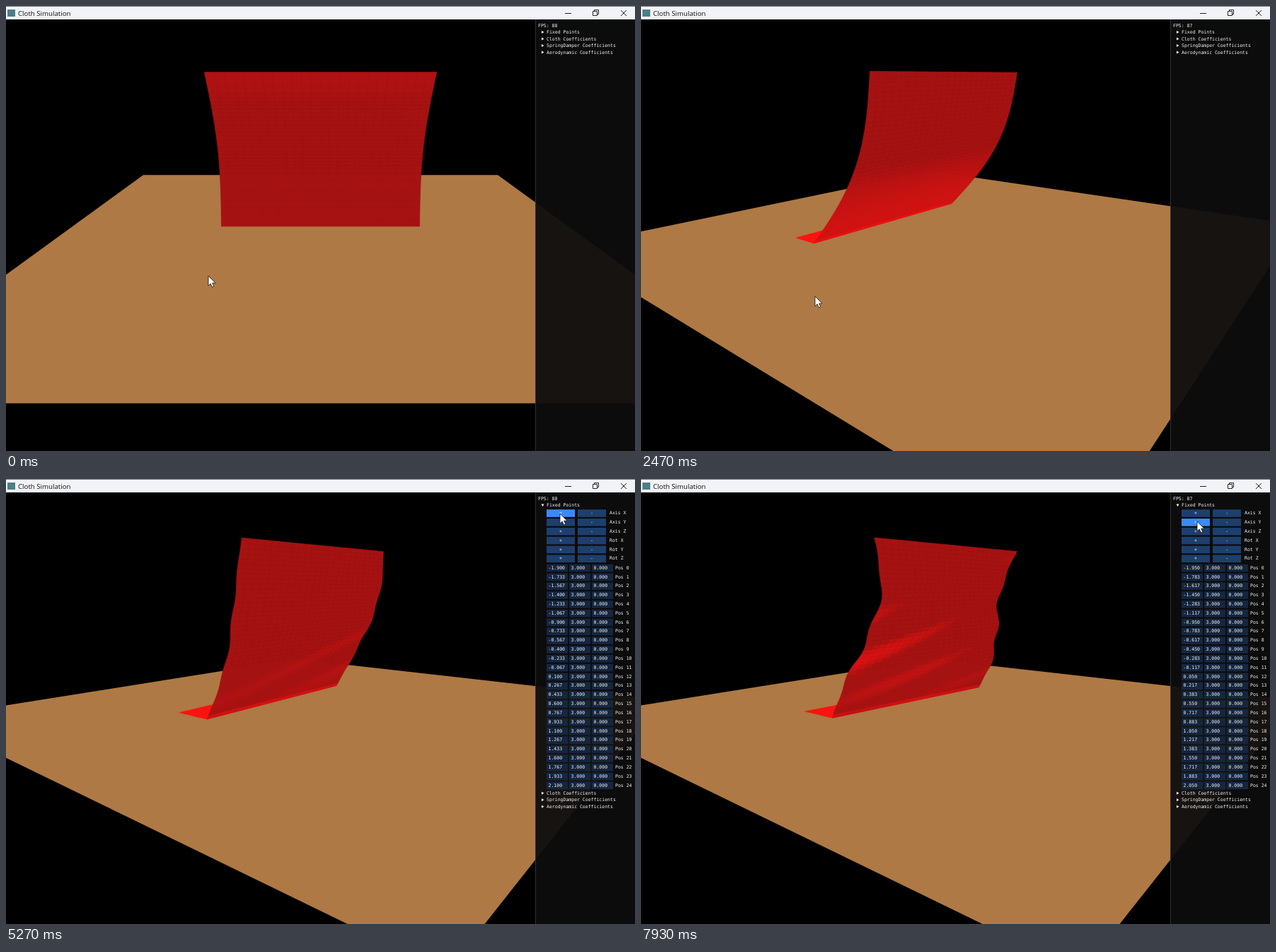
Recreate the animation shown at these times as an HTML page with a canvas. Size 889 px wide and 630 px high, loop 8 s.

```html
<!DOCTYPE html>
<html lang="en">
<head>
<meta charset="utf-8">
<title>Cloth Simulation</title>
<style>
  html, body { margin: 0; width: 100%; height: 100%; overflow: hidden; background: #000; }
  canvas { display: block; }
</style>
</head>
<body>
<canvas id="stage" width="889" height="630"></canvas>
<script>
const ctx = document.getElementById('stage').getContext('2d');
const LOOP = 8000, PANEL_X = 748, TITLE_HEIGHT = 19;
const TREE_OPENS = 3900;
const CLOTH_HEIGHT = 3, CLOTH_LENGTH = 4;
const ROWS = 40, COLUMNS = 24;

// Where the pointer rests or turns
const cursorStops = [
  { t: 0, x: 286, y: 382 }, { t: 930, x: 286, y: 384 }, { t: 1270, x: 225, y: 413 },
  { t: 2470, x: 246, y: 411 }, { t: 2700, x: 248, y: 385 }, { t: 3250, x: 762, y: 105 },
  { t: 3650, x: 766, y: 40 }, { t: 4400, x: 766, y: 40 }, { t: 4650, x: 783, y: 49 },
  { t: 5900, x: 783, y: 49 }, { t: 6150, x: 832, y: 49 }, { t: 7300, x: 832, y: 49 },
  { t: 7650, x: 786, y: 60 }
];

// land: how far back the cloth meets the floor, skew: difference towards the right,
// bow: bulge towards the viewer, twist: opposite bulges of the two sides
const clothPoses = [
  { t: 0, land: 0.55, skew: 0, bow: -0.45, twist: 0 },
  { t: 1270, land: 1.22, skew: 0, bow: -0.03, twist: -0.32 },
  { t: 2470, land: 1.72, skew: 0, bow: 0.4, twist: 0 },
  { t: 3330, land: 1.45, skew: 0, bow: 0.13, twist: 0 },
  { t: 4330, land: 1.36, skew: 0, bow: 0.36, twist: 0 },
  { t: 6200, land: 0.89, skew: 0.16, bow: 0.12, twist: -0.12 },
  { t: 7930, land: 1.1, skew: -0.15, bow: 0.2, twist: 0.2 }
];

const clamp = u => Math.max(0, Math.min(1, u));
const ramp = (t, from, to) => clamp((t - from) / (to - from));
const smooth = u => u * u * (3 - 2 * u);
const clicks = (t, first, every, most) =>
  Math.max(0, Math.min(most, 1 + Math.floor((t - first) / every)));

function sample(keys, t, ease = u => u) {
  const next = keys.findIndex(k => k.t > t);
  if (next < 0) return keys[keys.length - 1];
  const a = keys[next - 1], b = keys[next], u = ease(ramp(t, a.t, b.t));
  return Object.fromEntries(Object.keys(a).map(k => [k, a[k] + (b[k] - a[k]) * u]));
}

// Orbit camera at distance 10 with a 45 degree field of view
function projector(t) {
  const azimuth = 51.2 * ramp(t, 960, 2460), elevation = 20 - 6.85 * ramp(t, 2300, 2700);
  const a = azimuth * Math.PI / 180, e = elevation * Math.PI / 180;
  const focal = 305 / Math.tan(Math.PI / 8);
  return ([x, y, z]) => {
    const side = x * Math.cos(a) + z * Math.sin(a);
    const front = z * Math.cos(a) - x * Math.sin(a);
    const scale = focal / (10 - front * Math.cos(e) - y * Math.sin(e));
    return [444.5 + side * scale, 325 - (y * Math.cos(e) - front * Math.sin(e)) * scale];
  };
}

function polygon(points, fill) {
  ctx.beginPath();
  points.forEach(p => ctx.lineTo(...p));
  ctx.closePath();
  ctx.fillStyle = fill;
  ctx.fill();
}

// Surface point: u runs down the hanging part (0 to 1) and on along the floor, v from -1 to 1 across
function clothSurface(t, shift) {
  const { land, skew, bow, twist } = sample(clothPoses, t);
  const ripple = 0.055 * ramp(t, 4800, 5800);
  return (u, v) => {
    const x = shift + 2 * v, reach = land + skew * v;
    if (u > 1) return [x, 0, -reach - (u - 1) * CLOTH_HEIGHT];
    const bulge = (bow - twist * v) * Math.sin(Math.PI * u);
    const wave = -0.7 * twist * v * Math.sin(2 * Math.PI * u);
    const wrinkles = ripple * Math.sin(Math.PI * u) * Math.sin(22 * u + 4 * v - t / 400);
    return [x, CLOTH_HEIGHT * (1 - u), -reach * u + bulge + wave + wrinkles];
  };
}

// Brightness 0 to 1: steep backward slopes and the part on the floor are lit
function clothLight(surface, u, v) {
  const step = 1 / ROWS;
  const [, y0, z0] = surface(Math.max(0, u - step), v), [, y1, z1] = surface(u + step, v);
  const [, , left] = surface(u, v - 0.05), [, , right] = surface(u, v + 0.05);
  const dy = y1 - y0, dz = z1 - z0, across = (right - left) / 0.2;
  return clamp((-dz / Math.hypot(dy, dz, dy * across) - 0.5) / 0.42);
}

function drawCloth(t, project, shift) {
  const surface = clothSurface(t, shift);
  const tail = CLOTH_LENGTH - Math.hypot(CLOTH_HEIGHT, sample(clothPoses, t).land);
  const tailRows = 10;
  const rowU = i => i <= ROWS ? i / ROWS : 1 + (i - ROWS) / tailRows * tail / CLOTH_HEIGHT;
  const columnV = j => 2 * j / COLUMNS - 1;
  ctx.lineWidth = 0.7;
  for (let i = ROWS + tailRows - 1; i >= 0; i--) {
    for (let j = COLUMNS - 1; j >= 0; j--) {
      const u0 = rowU(i), u1 = rowU(i + 1), v0 = columnV(j), v1 = columnV(j + 1);
      const light = clothLight(surface, (u0 + u1) / 2, (v0 + v1) / 2);
      const color = `rgb(${165 + 90 * light},18,18)`;
      polygon([[u0, v0], [u0, v1], [u1, v1], [u1, v0]].map(p => project(surface(...p))), color);
      ctx.strokeStyle = color;
      ctx.stroke();
    }
  }
}

function rect(x, y, w, h, fill) {
  ctx.fillStyle = fill;
  ctx.fillRect(x, y, w, h);
}

function label(text, x, y, align = 'left') {
  ctx.fillStyle = '#f4f4f4';
  ctx.font = '6.5px "DejaVu Sans Mono", monospace';
  ctx.textAlign = align;
  ctx.textBaseline = 'middle';
  ctx.fillText(text, x, y);
}

function treeNode(text, y, open, hovered) {
  if (hovered) rect(752, y - 4, 137, 7.5, '#2b70c6');
  polygon(open ? [[756.5, y - 2], [760.5, y - 2], [758.5, y + 1.5]]
               : [[757, y - 2.5], [760.5, y - 0.5], [757, y + 1.5]], '#fff');
  label(text, 764, y);
}

function drawPanel(t, shift, cursor) {
  rect(PANEL_X, TITLE_HEIGHT, 141, 611, 'rgba(13,13,14,0.94)');
  rect(PANEL_X, TITLE_HEIGHT, 1, 611, 'rgba(80,80,95,0.5)');
  const slow = (t > 2000 && t < 3000) || t > 7500;
  label('FPS: ' + (slow ? 87 : 88), 752, 28);

  const open = t >= TREE_OPENS;
  const over = (x, y, w, h) => cursor.x >= x && cursor.x < x + w && cursor.y >= y && cursor.y < y + h;
  treeNode('Fixed Points', 37.5, open, over(752, 33, 137, 9));
  if (open) {
    ['Axis X', 'Axis Y', 'Axis Z', 'Rot X', 'Rot Y', 'Rot Z'].forEach((name, i) => {
      const y = 48.5 + i * 12.86;
      ['+', '-'].forEach((sign, j) => {
        const box = [764 + j * 44, y - 5.3, 40, 10.6];
        rect(...box, over(...box) ? '#3b8bf5' : '#1d3f6d');
        label(sign, box[0] + 20, y, 'center');
      });
      label(name, 853, y);
    });
    for (let i = 0; i < 25; i++) {
      const y = 126 + i * 12.83;
      [shift - 2 + i / 6, 3, 0].forEach((value, j) => {
        const x = 764 + j * 32;
        rect(x, y - 5.3, 30, 10.6, '#15263f');
        label(value.toFixed(3), x + 2.5, y);
      });
      label('Pos ' + i, 861, y);
    }
  }
  const top = open ? 445.3 : 47;
  ['Cloth', 'SpringDamper', 'Aerodynamic'].forEach((name, i) =>
    treeNode(name + ' Coefficients', top + i * 9.5));
}

function drawTitleBar() {
  rect(0, 0, 889, TITLE_HEIGHT, '#f2f3f8');
  rect(0, 0, 889, 1, '#777');
  rect(2, 5, 11, 10, '#4c7f86');
  ctx.fillStyle = '#111';
  ctx.font = '9.7px "Open Sans", sans-serif';
  ctx.textAlign = 'left';
  ctx.textBaseline = 'alphabetic';
  ctx.fillText('Cloth Simulation', 17, 14);
  ctx.strokeStyle = '#222';
  ctx.lineWidth = 1;
  ctx.stroke(new Path2D(
    'M790 10.5h9 M829.5 7.5h6v6h-6z M831.5 7.5v-2h6v6h-2 M869 6l8 8 M877 6l-8 8'));
}

const arrow = new Path2D('M0 0V14L3.2 11L5.4 16L7.8 15L5.6 10.2H10Z');
function drawCursor({ x, y }) {
  ctx.save();
  ctx.translate(x, y);
  ctx.fillStyle = '#fff';
  ctx.strokeStyle = '#111';
  ctx.lineWidth = 0.8;
  ctx.fill(arrow);
  ctx.stroke(arrow);
  ctx.restore();
}

function draw(t) {
  const project = projector(t);
  const cursor = sample(cursorStops, t, smooth);
  const shift = 0.05 * (clicks(t, 4800, 300, 4) - clicks(t, 6450, 250, 3));

  rect(0, 0, 889, 630, '#000');
  polygon([[-5, 0, -5], [5, 0, -5], [5, 0, 5], [-5, 0, 5]].map(project), '#ae7944');
  drawCloth(t, project, shift);
  drawPanel(t, shift, cursor);
  drawTitleBar();
  drawCursor(cursor);
}

function frame() {
  draw(performance.now() % LOOP);
  requestAnimationFrame(frame);
}
frame();
</script>
</body>
</html>
```
